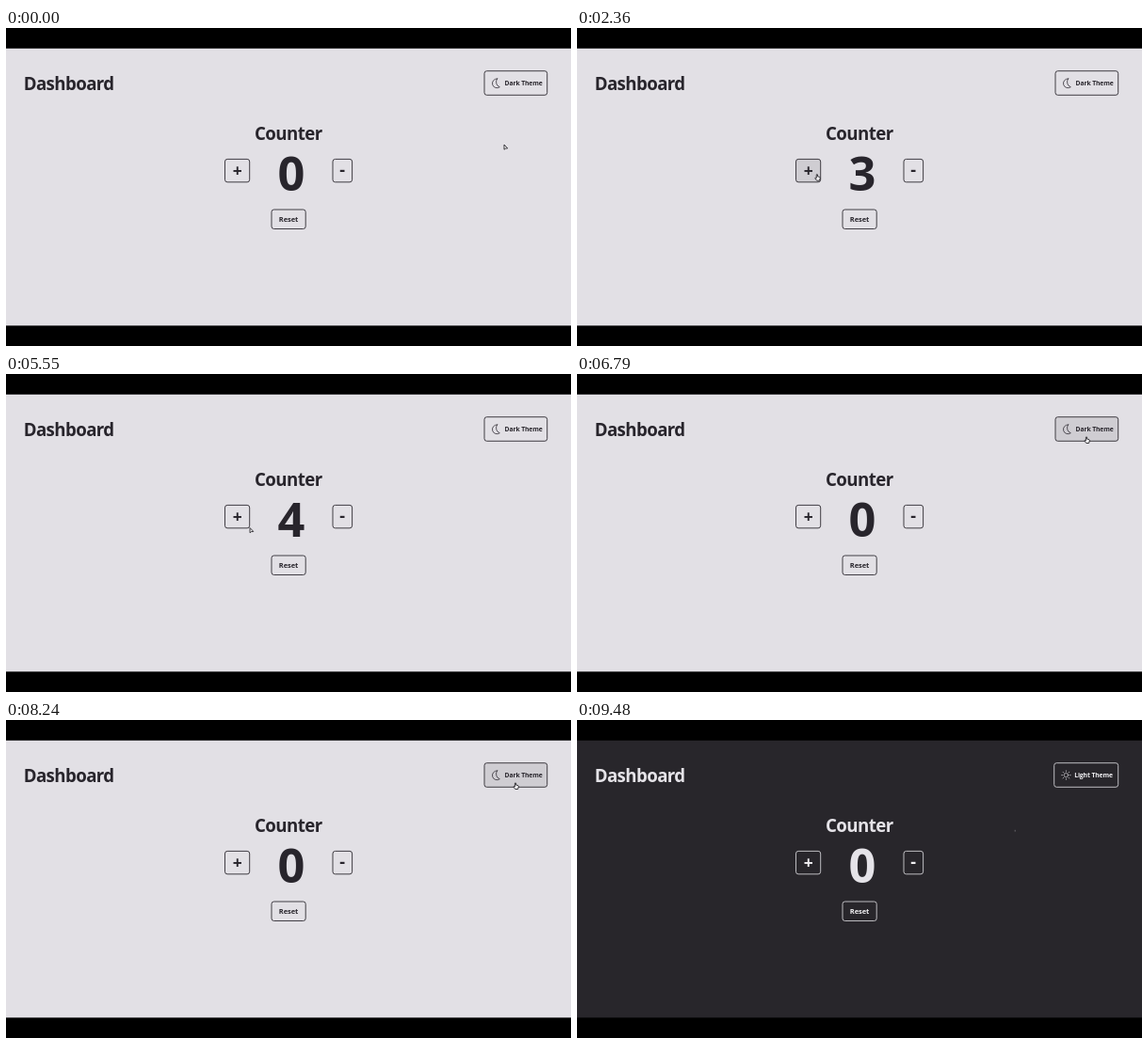
Recreate the animation shown at these times as an HTML page. Size 600 by 338 pixels, loop 9.51 s.

```html
<!DOCTYPE html>
<html lang="en">
<head>
<meta charset="utf-8">
<title>Counter dashboard</title>
<style>
  html, body { margin: 0; width: 100%; height: 100%; overflow: hidden; background: #000; }
  svg {
    display: block; width: 600px; height: 338px;
    --bg: #e2e0e5; --ink: #28252c; --label: #28252c; --line: #38353c; --hover: #cfcdd2;
    font-family: "Open Sans", "Noto Sans", sans-serif; font-weight: 700;
  }
  svg.dark { --bg: #28262b; --ink: #e5e3e8; --label: #f1f0f3; --line: #c6c4c9; --hover: #050507; }
  .page { fill: var(--bg); }
  text { fill: var(--ink); }
  .mid { text-anchor: middle; }
  .title { font-size: 18.7px; letter-spacing: -.6px; }
  .label { fill: var(--label); letter-spacing: -.1px; }
  .btn { fill: var(--bg); stroke: var(--line); stroke-width: .95; }
  .btn.on { fill: var(--hover); }
  .icon { fill: none; stroke: var(--ink); stroke-width: .75; stroke-linecap: round; stroke-linejoin: round; }
  .dark .icon { stroke-width: .6; }
  .dark .light-only, .dark-only { display: none; }
  .dark .dark-only { display: inline; }
  .cursor { fill: #f4f3f5; stroke: #1c1a1f; stroke-width: .85; stroke-linejoin: round; }
  .glint { stroke: #98969b; stroke-width: .6; }
</style>
</head>
<body>
<svg id="stage" viewBox="0 0 600 338">
  <rect width="600" height="338" fill="#000"/>
  <rect class="page" y="21.75" width="600" height="294.6"/>
  <text class="title" x="18.7" y="66">Dashboard</text>
  <text class="title mid" x="299.8" y="119">Counter</text>
  <g id="buttons"></g>

  <g class="icon">
    <path class="light-only" d="M521.6 53.9A4.9 4.9 0 1 0 524.3 62.7A5.6 5.6 0 0 1 521.6 53.9Z"/>
    <g class="dark-only" id="sun"><circle cx="519.4" cy="58.6" r="2.2"/></g>
  </g>
  <g font-size="6.75">
    <text class="label light-only" x="529.6" y="61">Dark Theme</text>
    <text class="label dark-only" x="528.2" y="61">Light Theme</text>
  </g>
  <text class="label mid" x="245.6" y="158" font-size="17.5">+</text>
  <text class="label mid" x="357.2" y="157.3" font-size="18">-</text>
  <text class="label mid" x="300" y="206.4" font-size="7.5">Reset</text>
  <text class="mid" id="count" x="302.8" y="173" font-size="50.5">0</text>

  <g id="cursor">
    <g class="light-only">
      <path class="cursor" id="arrow" d="M0 0V5.2L1.4 4.1L3.7 3.9Z"/>
      <path class="cursor" id="hand" d="M-.6 .6Q0-.4.6.6V2.6L2.9 3.2Q3.6 3.5 3.3 4.6L2.6 7H-.2L-2.2 4.4Q-1.8 3.5-.6 4.4Z"/>
    </g>
    <path class="glint dark-only" d="M.5 1.8V3.6"/>
  </g>
</svg>
<script>
const LOOP = 9510;
const $ = id => document.getElementById(id);

function add(parent, tag, attrs) {
  const el = document.createElementNS('http://www.w3.org/2000/svg', tag);
  for (const key in attrs) el.setAttribute(key, attrs[key]);
  return parent.appendChild(el);
}

function button(x, y, width, height, click) {
  const el = add($('buttons'), 'rect', { class: 'btn', x, y, width, height, rx: 2.6 });
  const contains = p => p.x >= x && p.x <= x + width && p.y >= y && p.y <= y + height;
  return { el, contains, click };
}

const buttons = [
  button(232.5, 139.4, 26.2, 24.4, s => s.count++),
  button(347, 139.4, 20.6, 24.4, s => s.count--),
  button(282, 193, 36.2, 20.5, s => s.count = 0),
  button(508, 45.7, 66.7, 25.6, s => s.dark = !s.dark)
];
const theme = buttons[3].el;

for (let angle = 0; angle < 360; angle += 45) {
  add($('sun'), 'path', { d: 'M523.1 58.6H524.2', transform: `rotate(${angle} 519.4 58.6)` });
}

// Cursor moves: start, end, x, y
const moves = [
  [0, 360, 541, 38],
  [360, 970, 301, 192],
  [970, 1700, 248, 155],
  [2240, 3030, 357, 158],
  [3420, 3910, 298, 199],
  [4090, 4640, 253, 158],
  [5450, 5900, 300, 201],
  [5980, 6390, 460, 97],
  [6450, 6790, 541, 66.5],
  [9210, 9480, 464.7, 115]
];
const clicks = [
  1880, 2030, 2240, 3240, 3420, 4090,
  4880, 5090, 5240, 5450, 5940, 7000, 8240, 9210
];

const ease = k => k * k * (3 - 2 * k);

function cursorAt(t) {
  const p = { x: 529, y: 124 };
  for (const [start, end, x, y] of moves) {
    if (t <= start) break;
    const k = ease(Math.min(1, (t - start) / (end - start)));
    p.x += (x - p.x) * k;
    p.y += (y - p.y) * k;
  }
  return p;
}

const buttonAt = p => buttons.find(b => b.contains(p));

// Each click acts on whatever lies under the cursor at that moment.
function stateAt(t) {
  const state = { count: 0, dark: false };
  for (const time of clicks) {
    if (time <= t) buttonAt(cursorAt(time))?.click(state);
  }
  return state;
}

function draw(t) {
  const { count, dark } = stateAt(t);
  const p = cursorAt(t);
  const over = buttonAt(p);
  for (const b of buttons) b.el.classList.toggle('on', b === over);
  $('stage').classList.toggle('dark', dark);
  theme.setAttribute('x', dark ? 506.7 : 508);
  theme.setAttribute('width', dark ? 68 : 66.7);
  $('count').textContent = count;
  $('cursor').setAttribute('transform', `translate(${p.x} ${p.y})`);
  $('arrow').style.display = over ? 'none' : '';
  $('hand').style.display = over ? '' : 'none';
}

const start = performance.now();
function tick() {
  draw((performance.now() - start) % LOOP);
  requestAnimationFrame(tick);
}
tick();
</script>
</body>
</html>
```
